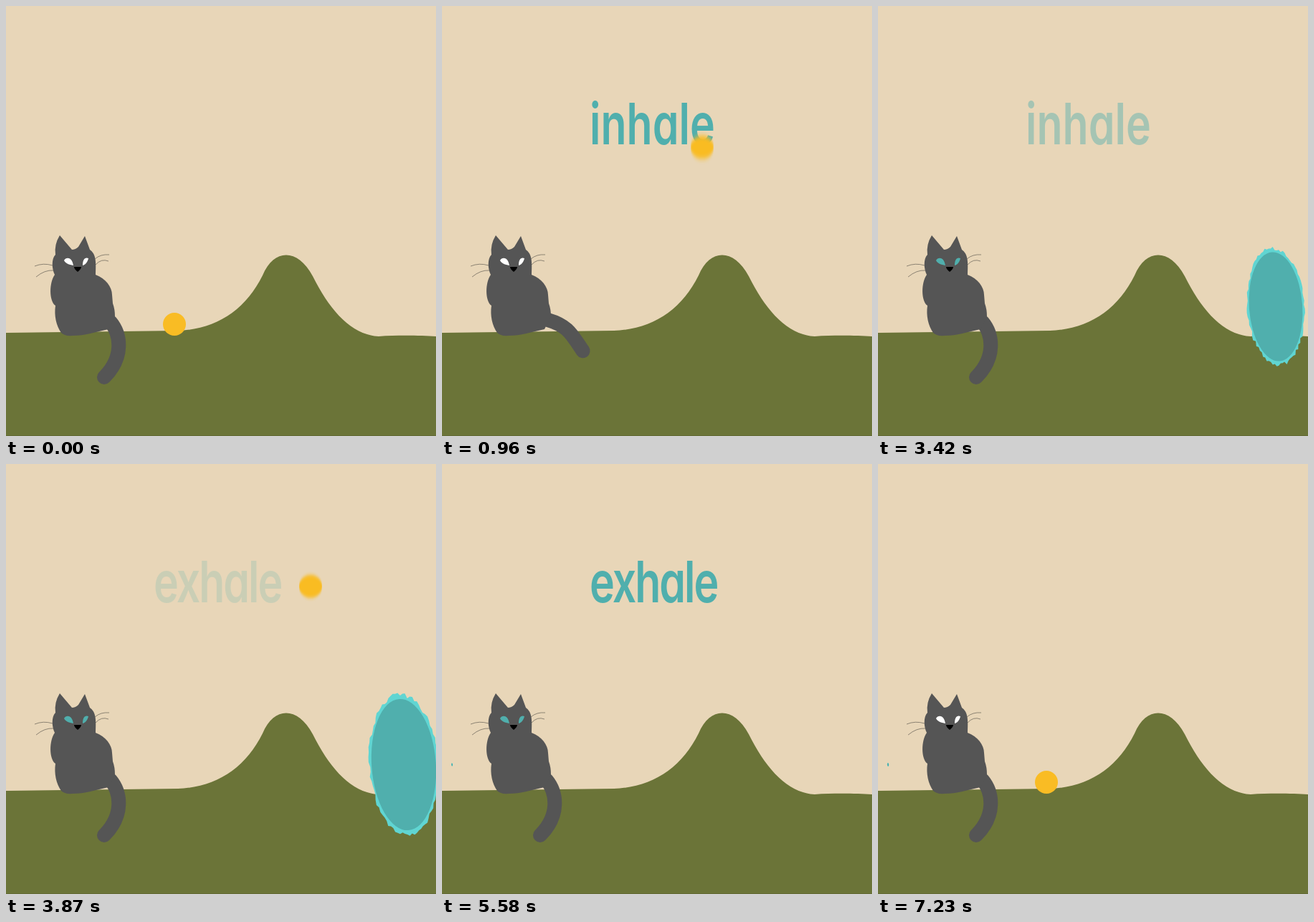
Animation of 600x600 px, one loop 7260 ms. Source, as an HTML page:

```html
<!DOCTYPE html>
<html lang="en">
<head>
<meta charset="utf-8">
<title>inhale, exhale</title>
<style>
  html, body { margin: 0; width: 100%; height: 100%; overflow: hidden; background: #e8d6b8; }
  svg { display: block; width: 100vw; height: 100vh; }
  text { font: 600 59px Inter, sans-serif; font-feature-settings: "cv11", "ss03"; fill: #50afad; }
  #exhale { letter-spacing: -2px; }
</style>
</head>
<body>
<svg viewBox="0 0 600 600">
  <defs>
    <clipPath id="between"><path d="M14-60H551V600H14Z"/></clipPath>
    <filter id="blur" x="-1" y="-1" width="3" height="3"><feGaussianBlur id="blurAmount" stdDeviation="0"/></filter>
    <path id="up" d="M235 444C300 440 340 405 350 365C358 335 363 300 363 260V-30"/>
    <path id="down" d="M425-30V310C425 350 445 390 470 420C490 440 505 443 551 443H580"/>
    <path id="home" d="M-4 443L235 444"/>
  </defs>
  <rect width="600" height="600" fill="#e8d6b8"/>
  <path fill="#6b7438" d="M0 456L240 453C294 451 334 424 358 376C374 338 407 338 428 377C452 425 482 459 520 461C550 459 580 460 600 461V600H0Z"/>
  <path fill="#626a35" d="M0 599H600V600H0Z"/>
  <g transform="translate(206 193) scale(1 1.36)">
    <text id="inhale">inhale</text>
    <text id="exhale">exhale</text>
  </g>
  <g id="portalRight"><path fill="#60d5d2"/><ellipse rx="42.5" ry="87" fill="#50afad"/></g>
  <g id="portalLeft"><path fill="#60d5d2"/><ellipse rx="42.5" ry="87" fill="#50afad"/></g>
  <g clip-path="url(#between)"><circle id="ball" r="16" fill="#f9bc24"/></g>
  <path id="tail" fill="none" stroke="#555" stroke-width="20" stroke-linecap="round"/>
  <path fill="#555" d="M75 320L92 340Q97 340 101 336L110 321L117 340C125 346 126 354 125 375C139 380 148 392 148 403L149 415Q152 423 152 433L143 451C125 455 110 460 93 460Q82 461 77 456C70 446 67 432 69 418C60 412 60 386 68 375C64 367 63 353 69 347Q67 333 75 320Z"/>
  <path id="eyes" d="M81 355C84 350 92 350 94 362C88 361 83 359 81 355ZM107 362C107 354 110 350 115 352C114 357 111 361 107 362Z"/>
  <path d="M95 364H105Q105 367 100 371Q95 367 95 364Z"/>
  <path fill="none" stroke="#655f55" stroke-width=".7" d="M40 363Q52 358 65 362M42 378Q54 368 66 369M124 353Q132 346 144 347M125 361Q133 352 143 356"/>
</svg>
<script>
const LOOP = 7260;
const $ = id => document.getElementById(id);
const ball = $('ball'), blurAmount = $('blurAmount');

const ramp = (t, from, to) => Math.min(1, Math.max(0, (t - from) / (to - from)));
const smooth = p => (1 - Math.cos(Math.PI * p)) / 2;
const backOut = (p, s) => 1 + (s + 1) * (p - 1) ** 3 + s * (p - 1) ** 2;
const noise = n => { const v = Math.sin(n * 127.1) * 43758.5453; return v - Math.floor(v); };

// Tail control points: hanging down, and swung towards the ball
const hanging = [146, 441, 160, 458, 165, 490, 137, 518];
const swung = [148, 438, 176, 446, 181, 458, 197, 481];

function drawTail(t) {
  const k = 1.28 * (t < 600 ? smooth(ramp(t, 150, 600)) : 1 - smooth(ramp(t, 600, 1750)));
  const [x, y, ...rest] = hanging.map((v, i) => v + (swung[i] - v) * k);
  $('tail').setAttribute('d', `M${x} ${y}C${rest}`);
}

function drawPortal(id, x, scale, t) {
  const portal = $(id);
  portal.style.display = scale > .003 ? '' : 'none';
  portal.setAttribute('transform', `translate(${x} 419.5) rotate(-4) scale(${scale})`);
  const points = [], seed = Math.floor(t / 90) * 71, count = 90;
  for (let i = 0; i < count; i++) {
    const a = i / count * 2 * Math.PI, r = 1.03 + .075 * noise(i + seed);
    points.push(`${42.5 * r * Math.cos(a)} ${87 * r * Math.sin(a)}`);
  }
  portal.firstChild.setAttribute('d', `M${points.join('L')}Z`);
}

function openClose(t, open, openTime, overshoot, close, closeTime) {
  if (t < open) return 0;
  return backOut(ramp(t, open, open + openTime), overshoot) * (1 - smooth(ramp(t, close, close + closeTime)));
}

const trips = [
  { path: $('up'), from: 600, to: 1416, ease: p => 1 - (1 - p) ** 1.5 },
  { path: $('down'), from: 3523, to: 4524, ease: p => p },
  { path: $('home'), from: 6000, to: 6800, ease: p => 1 - (1 - p) ** 2 }
];

function ballAt(t) {
  const trip = trips.findLast(trip => t >= trip.from) || trips[0];
  const p = trip.ease(ramp(t, trip.from, trip.to));
  return trip.path.getPointAtLength(p * trip.path.getTotalLength());
}

function drawBall(t) {
  const now = ballAt(t), next = ballAt(t + 4);
  const vx = Math.abs(next.x - now.x) / 4, vy = Math.abs(next.y - now.y) / 4;
  const moving = vx + vy > .1 && vx + vy < 3;
  ball.setAttribute('cx', now.x);
  ball.setAttribute('cy', now.y);
  blurAmount.setAttribute('stdDeviation', moving ? `${vx * 1.5} ${vy * 5}` : '0');
  if (moving) ball.setAttribute('filter', 'url(#blur)');
  else ball.removeAttribute('filter');
}

function draw(t) {
  $('inhale').style.opacity = ramp(t, 30, 700) - ramp(t, 3100, 3670);
  $('exhale').style.opacity = ramp(t, 3780, 4250) - ramp(t, 6780, 7220);
  const teal = ramp(t, 2400, 3050) - ramp(t, 6700, 7200);
  const mix = [80, 175, 173].map(c => 255 + (c - 255) * teal);
  $('eyes').setAttribute('fill', `rgb(${mix})`);
  drawTail(t);
  drawPortal('portalRight', 555, openClose(t, 3290, 680, 3.2, 4560, 500), t);
  drawPortal('portalLeft', 14, openClose(t, 5579, 450, 1.9, 6800, 480), t);
  drawBall(t);
}

const start = performance.now();
function tick() {
  draw((performance.now() - start) % LOOP);
  requestAnimationFrame(tick);
}
tick();
</script>
</body>
</html>
```
